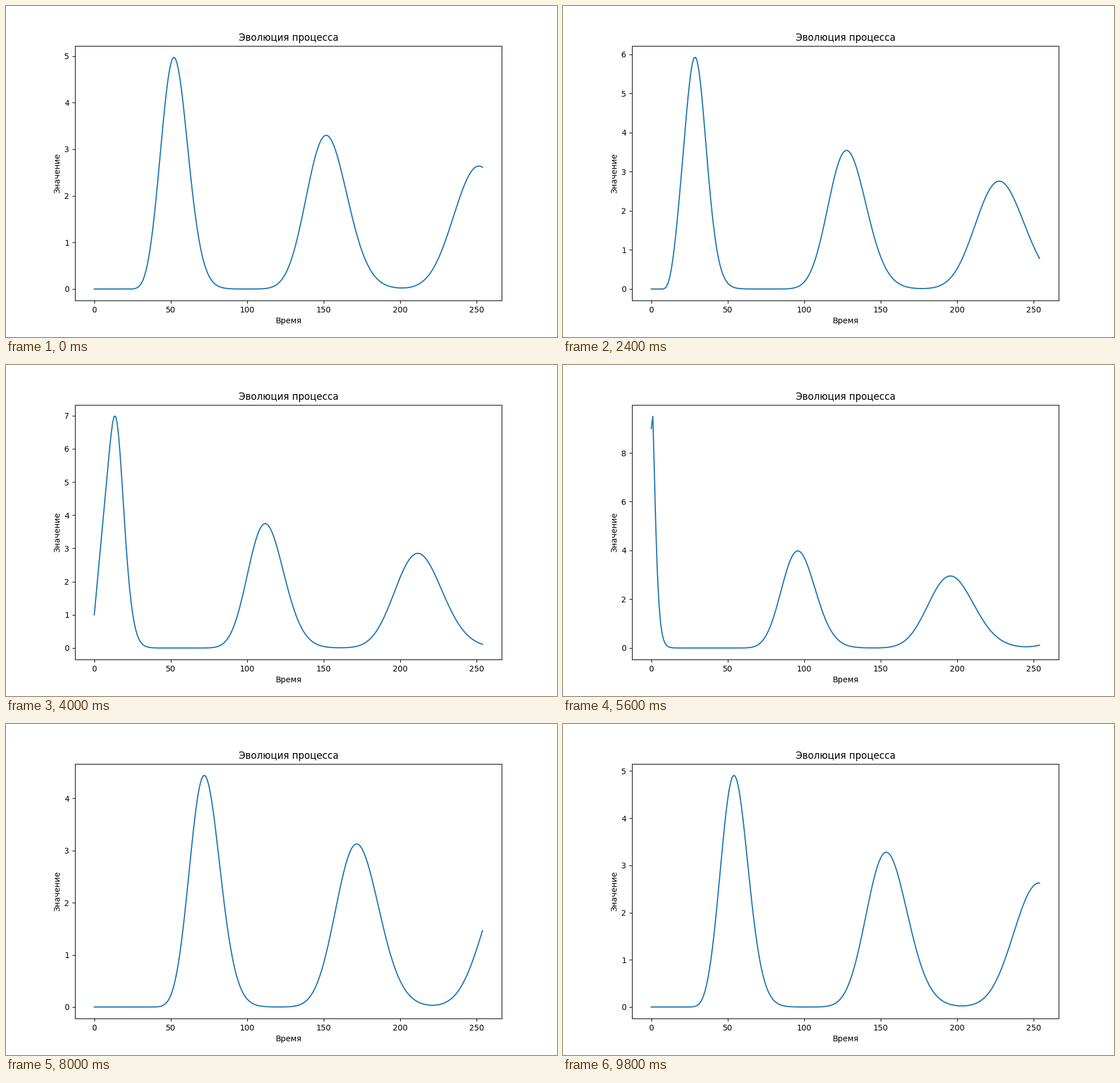
Animation, 966 px wide and 580 px high, one loop 10000 ms. Source, as a matplotlib script:

```python
import matplotlib.pyplot as plt
import numpy as np
from matplotlib.animation import FuncAnimation

CELLS = 50
STEPS = 255
COURANT = 0.5
INTERVAL = 200


def solve():
    """Upwind transport of a ramp on a ring; rows are time steps."""
    u = np.zeros((STEPS, CELLS))
    u[0, 20:30] = np.arange(1, 11)
    for t in range(1, STEPS):
        prev = u[t - 1]
        u[t] = prev + COURANT * (np.roll(prev, -1) - prev)
    return u


values = solve()
time = np.arange(STEPS)

fig, ax = plt.subplots(figsize=(9.66, 5.8), dpi=100)
line, = ax.plot(time, values[:, 0])
ax.set_title("Эволюция процесса")
ax.set_xlabel("Время")
ax.set_ylabel("Значение")


def update(cell):
    line.set_data(time, values[:, cell])
    ax.relim()
    ax.autoscale_view()
    return line,


anim = FuncAnimation(fig, update, frames=CELLS, interval=INTERVAL,
                     repeat=True, repeat_delay=0, blit=False)
plt.show()
```
